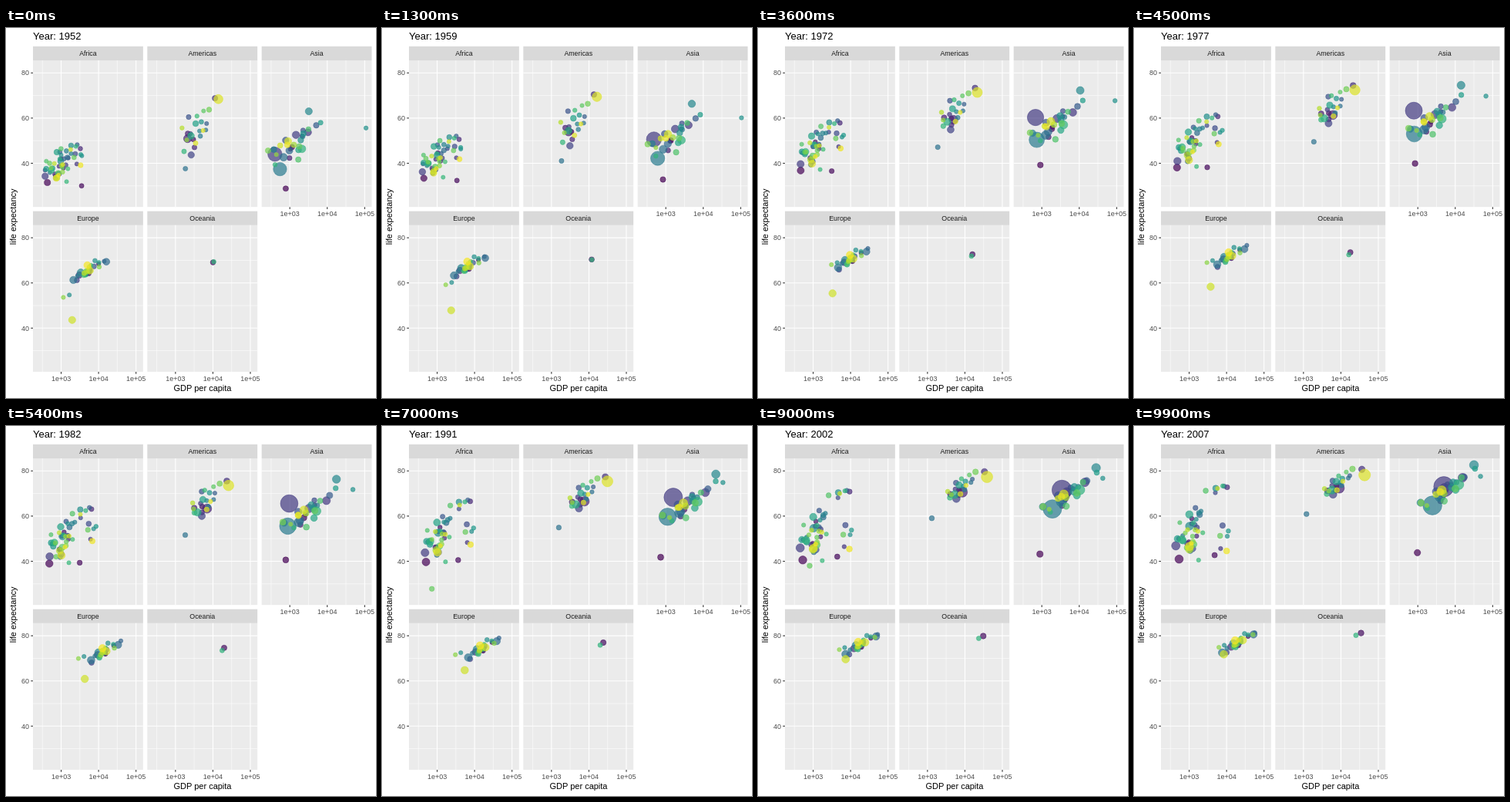
An HTML page for the animation above (10 s loop, 480 by 480 pixels).

```html
<!DOCTYPE html>
<html lang="en">
<head>
<meta charset="utf-8">
<title>Life expectancy and GDP</title>
<style>
html, body { margin: 0; width: 100%; height: 100%; overflow: hidden; background: #fff; }
svg { display: block; width: 480px; height: 480px; font-family: "Liberation Sans", Arial, sans-serif; }
.tick { font-size: 9px; fill: #4d4d4d; }
.strip { font-size: 8.8px; fill: #1a1a1a; }
.label { font-size: 11px; }
.title { font-size: 13px; }
.mid { text-anchor: middle; }
.end { text-anchor: end; }
</style>
</head>
<body>
<svg id="stage" viewBox="0 0 480 480"></svg>
<script>
const stage = document.getElementById('stage');
const LEFT = 35, TOP = 42, W = 142.83, H = 190.16, GAP = 5.5, STRIP = 18.2;
const START = 1952, SPAN = 55, STEPS = 100, STEP_MS = 100;

const lerp = (a, b, t) => a + (b - a) * t;
const gdpX = log => (log - 2.248) * 48.57;
const lifeY = life => (85.553 - life) * 2.93;

function add(tag, attrs, text) {
  const el = document.createElementNS('http://www.w3.org/2000/svg', tag);
  for (const key in attrs) el.setAttribute(key, attrs[key]);
  if (text) el.textContent = text;
  return stage.appendChild(el);
}
const rect = (x, y, width, height, fill) => add('rect', { x, y, width, height, fill });
const label = (text, x, y, cls, more) => add('text', { x, y, class: cls, ...more }, text);
const line = (x1, y1, x2, y2, stroke, width) =>
  add('line', { x1, y1, x2, y2, stroke, 'stroke-width': width });

// Paths are [GDP, life expectancy] at evenly spaced years.
// A lone dot has its own path. A cloud follows the path of its centre:
// "wide" is its half width in log GDP, "tall" its half height at the start
// and end, "slope" the years of life gained per tenfold GDP.
const panels = [
  { name: 'Africa', col: 0, row: 0, growth: 3.5,
    lone: [
      { hue: 3, pop: 12, path: [[3521, 30], [3000, 39], [4797, 42.7]] },
      { hue: 107, pop: 9, path: [[493, 40], [510, 44], [740, 46], [720, 24], [863, 46]] }],
    clouds: [
      { count: 37, pop: 110, path: [[830, 38.5], [1080, 49], [1100, 53]], wide: 0.5, tall: [9, 14], slope: 5 },
      { count: 7, pop: 70, path: [[2100, 46], [4000, 61], [6800, 72.5]], wide: 0.4, tall: [6, 3], slope: 4 },
      { count: 6, pop: 40, path: [[2600, 42], [5800, 54], [8000, 50]], wide: 0.4, tall: [5, 9], slope: 6 }] },
  { name: 'Americas', col: 1, row: 0, growth: 2.2,
    lone: [
      { hue: 134, pop: 301, path: [[13990, 68.4], [20700, 71], [29900, 75], [42952, 78.2]] },
      { hue: 20, pop: 33, path: [[11367, 68.8], [22500, 75], [36319, 80.7]] },
      { hue: 14, pop: 190, path: [[2109, 50.9], [6800, 62.4], [9066, 72.4]] },
      { hue: 53, pop: 8, path: [[1840, 37.6], [1900, 50.7], [1202, 60.9]] }],
    clouds: [
      { count: 21, pop: 90, path: [[3500, 53], [5900, 65], [8200, 74]], wide: 0.45, tall: [10, 4], slope: 13 }] },
  { name: 'Asia', col: 2, row: 0, growth: 2.5,
    lone: [
      { hue: 24, pop: 1319, path: [[400, 44], [570, 56.5], [840, 64.8], [1800, 69], [4959, 73]] },
      { hue: 58, pop: 1110, path: [[547, 37.4], [710, 49.5], [1000, 59], [2452, 64.7]] },
      { hue: 71, pop: 2, path: [[108382, 55.6], [100000, 67], [32000, 74.5], [47307, 77.6]] },
      { hue: 0, pop: 32, path: [[779, 28.8], [940, 39], [700, 41.5], [975, 43.8]] },
      { hue: 66, pop: 127, path: [[3217, 63], [16600, 75.7], [31656, 82.6]] }],
    clouds: [
      { count: 28, pop: 200, path: [[1250, 48], [2700, 60], [5500, 71]], wide: 0.85, tall: [9, 5], slope: 12 }] },
  { name: 'Europe', col: 0, row: 1, growth: 1.35,
    lone: [
      { hue: 131, pop: 71, path: [[1969, 43.6], [4000, 59.8], [8458, 71.8]] }],
    clouds: [
      { count: 2, pop: 5, path: [[1250, 54.5], [3300, 68.5], [3000, 72], [6600, 75.7]], wide: 0.2, tall: [1, 1], slope: 6 },
      { count: 27, pop: 85, path: [[5600, 66], [14000, 73], [22000, 77.5]], wide: 0.5, tall: [2.5, 2], slope: 13 }] },
  { name: 'Oceania', col: 1, row: 1, growth: 2.3,
    lone: [
      { hue: 5, pop: 20, path: [[10040, 69.1], [18900, 74], [34435, 81.2]] },
      { hue: 91, pop: 4, path: [[10557, 69.4], [17000, 72.8], [25185, 80.2]] }],
    clouds: [] }
];
for (const p of panels) {
  p.x = LEFT + p.col * (W + GAP);
  p.y = TOP + p.row * (H + GAP + STRIP);
}

function random(seed) {
  return () => (seed = seed * 16807 % 2147483647) / 2147483647;
}
const rnd = random(20611);
const bell = () => rnd() - rnd();

// Finds the segment of an evenly spaced list for t in 0..1.
function segment(count, t) {
  const at = t * (count - 1), i = Math.min(Math.floor(at), count - 2);
  return [i, at - i];
}

const stops = ['440154', '482878', '3e4989', '31688e', '26828e', '1f9e89', '35b779', '6ece58', 'b5de2b', 'fde725']
  .map(hex => [0, 2, 4].map(i => parseInt(hex.slice(i, i + 2), 16)));

function viridis(hue) {
  const [i, f] = segment(stops.length, hue / 141);
  return `rgb(${stops[i].map((c, k) => Math.round(lerp(c, stops[i + 1][k], f)))})`;
}

const radius = pop => 2.49 + 10.67 * Math.sqrt(pop / 1319);

function makeDot(panel, { hue, pop, path }, shift = () => [0, 0]) {
  const keys = path.map(([gdp, life], i) => {
    const [dx, dy] = shift(i / (path.length - 1));
    return [panel.x + gdpX(Math.log10(gdp) + dx), panel.y + lifeY(life + dy)];
  });
  return { hue, keys, r: [radius(pop / panel.growth), radius(pop)] };
}

function cloudDots(panel, { count, pop, path, wide, tall, slope }) {
  return Array.from({ length: count }, (_, i) => {
    const hue = (i + rnd()) / count * 141;
    const wealth = bell(), health = bell();
    const shift = t => {
      const dx = wide * (wealth + 0.15 * bell());
      return [dx, dx * slope + lerp(...tall, t) * (health + 0.2 * bell())];
    };
    return makeDot(panel, { hue, pop: 0.5 + pop * rnd() ** 4, path }, shift);
  });
}

function drawPanel({ name, x, y, col, row }) {
  rect(x, y - STRIP, W, STRIP, '#d9d9d9');
  label(name, x + W / 2, y - 6, 'strip mid');
  rect(x, y, W, H, '#ebebeb');
  const across = (life, w) => line(x, y + lifeY(life), x + W, y + lifeY(life), '#fff', w);
  const down = (log, w) => line(x + gdpX(log), y, x + gdpX(log), y + H, '#fff', w);
  const lives = [40, 60, 80], logs = [3, 4, 5];
  lives.forEach(v => across(v - 10, 0.53));
  logs.forEach(v => down(v - 0.5, 0.53));
  lives.forEach(v => across(v, 1.07));
  logs.forEach(v => down(v, 1.07));
  if (col === 0) lives.forEach(v => {
    const ty = y + lifeY(v);
    line(x - 2.75, ty, x, ty, '#333', 1.07);
    label(v, x - 5, ty + 3.2, 'tick end');
  });
  if (row === 1 || col === 2) logs.forEach(v => {
    const tx = x + gdpX(v);
    line(tx, y + H, tx, y + H + 2.75, '#333', 1.07);
    label('1e+0' + v, tx, y + H + 12, 'tick mid');
  });
}

rect(0, 0, 480, 480, '#fff');
panels.forEach(drawPanel);
label('GDP per capita', 255, 471, 'label mid');
label('life expectancy', 0, 0, 'label mid', { transform: 'translate(12.8 244.8) rotate(-90)' });
const title = label('Year: ' + START, 35, 14.5, 'title');

const dots = panels.flatMap(p => [
  ...p.lone.map(dot => makeDot(p, dot)),
  ...p.clouds.flatMap(cloud => cloudDots(p, cloud))
]).sort((a, b) => a.hue - b.hue);

for (const dot of dots) {
  const color = viridis(dot.hue);
  dot.el = add('circle', {
    fill: color, stroke: color, 'stroke-width': 0.7, 'fill-opacity': 0.7, 'stroke-opacity': 0.7
  });
}

function draw(t) {
  title.textContent = 'Year: ' + Math.round(START + SPAN * t);
  for (const { el, keys, r } of dots) {
    const [i, f] = segment(keys.length, t);
    el.setAttribute('cx', lerp(keys[i][0], keys[i + 1][0], f).toFixed(2));
    el.setAttribute('cy', lerp(keys[i][1], keys[i + 1][1], f).toFixed(2));
    el.setAttribute('r', lerp(...r, t).toFixed(2));
  }
}

let shown = -1;
function tick() {
  const step = Math.floor(performance.now() / STEP_MS) % STEPS;
  if (step !== shown) draw((shown = step) / (STEPS - 1));
  requestAnimationFrame(tick);
}
tick();
</script>
</body>
</html>
```
